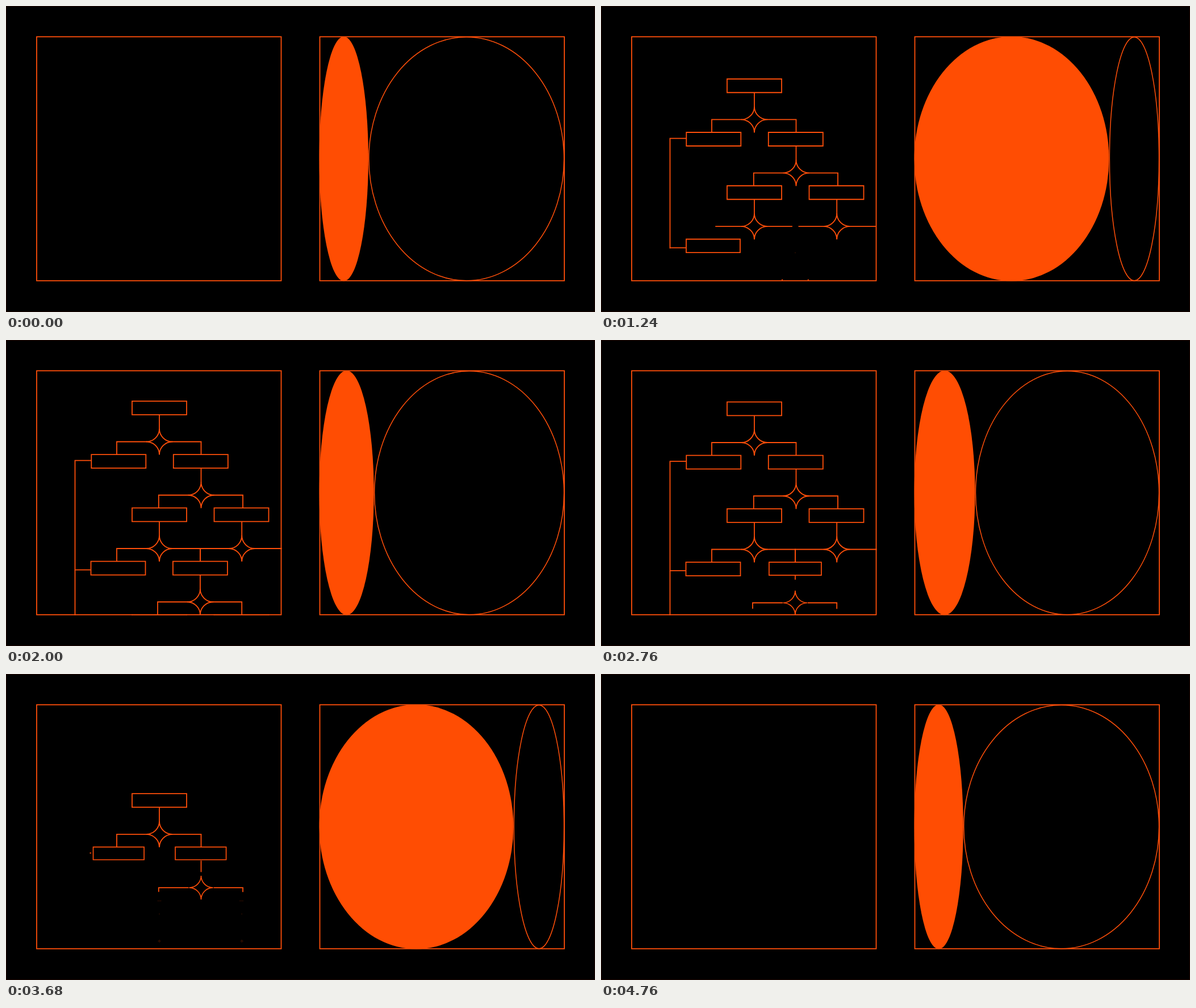
These frames come from a looping animation (1037 px wide and 540 px high, 4.8 s). An HTML page:

```html
<!DOCTYPE html>
<html lang="en">
<head>
<meta charset="utf-8">
<title>Growing flowchart and trading ellipses</title>
<style>
  html, body { margin: 0; width: 100%; height: 100%; overflow: hidden; background: #000; }
  svg { display: block; width: 100%; height: 100%; fill: none; stroke: #ff4f0a; stroke-width: 1.8; }
  #edge { stroke: #1e0600; stroke-width: 1; }
  #solid { fill: #ff4d03; stroke: none; }
  #ring { stroke-width: 1.5; }
</style>
</head>
<body>
<svg viewBox="0 0 1037 540">
  <clipPath id="panel"><rect x="53" y="53.4" width="432.6" height="432.3"/></clipPath>
  <rect id="edge" x=".5" y=".5" width="1036" height="539"/>
  <g clip-path="url(#panel)"><g id="tree"></g></g>
  <rect x="54" y="54.3" width="430.5" height="430.5"/>
  <rect x="552.5" y="54.3" width="430.5" height="430.5"/>
  <ellipse id="solid" cy="269.7" ry="215.8"/>
  <ellipse id="ring" cy="269.7" ry="215"/>
</svg>
<script>
const LOOP = 4800, STEP = 40, MIRROR = 4334;
const ARM = 23, BOX_W = 96, BOX_H = 24;
const $ = id => document.getElementById(id);
const tree = $('tree'), parts = [];

// Closed form of cubic-bezier(1, 0, 0, 1)
function ease(x) {
  x = Math.min(1, Math.max(0, x));
  const s = (1 + Math.cbrt(2 * x - 1)) / 2;
  return s * s * (3 - 2 * s);
}
const progress = (t, start, dur) => ease((t - start) / dur);

function add(d, start, dur, update) {
  const el = document.createElementNS('http://www.w3.org/2000/svg', 'path');
  el.setAttribute('d', d);
  tree.append(el);
  parts.push({ el, start, dur, update });
  return el;
}

function grow(x, y, d, start) {
  add(d, start, 500, (el, p) => {
    el.setAttribute('transform', `translate(${x} ${y}) scale(${p})`);
  });
}

function line(d, start, dur = 500) {
  const el = add(d, start, dur, (el, p) => {
    el.setAttribute('stroke-dasharray', `${p} 2`);
    el.setAttribute('visibility', p > 0 ? 'visible' : 'hidden');
  });
  el.setAttribute('pathLength', 1);
}

// Boxes grow from the middle of their top side, stars from their centre
const box = (x, y, start) =>
  grow(x, y, `M${-BOX_W / 2} 0h${BOX_W}v${BOX_H}h${-BOX_W}z`, start);

const star = (x, y, start) => {
  const arc = (dx, dy) => `a${ARM} ${ARM} 0 0 0 ${dx} ${dy}`;
  grow(x, y, `M0 ${-ARM}` + arc(ARM, ARM) + arc(-ARM, ARM) + arc(-ARM, -ARM) + arc(ARM, -ARM) + 'z', start);
};

// Connector below a box, its star, and the two arms that lead to the next row
function fork(x, top, left, right, at, dur = 500) {
  const y = top + 71.7;
  line(`M${x} ${top + BOX_H}V${y - ARM + 1}`, at.stem, dur);
  star(x, y, at.star);
  line(`M${x - ARM + 1} ${y}H${left}V${y + 22.6}`, at.arms, dur);
  line(`M${x + ARM - 1} ${y}H${right}V${y + 22.6}`, at.arms, dur);
}

const rows = [0, 1, 2, 3, 4].map(i => 107.8 + 94.25 * i);

box(270, rows[0], 60);
fork(270, rows[0], 195, 343.5, { stem: 110, star: 90, arms: 130 });

box(198.3, rows[1], 324);
box(342.8, rows[1], 324);
fork(343.5, rows[1], 268.8, 417, { stem: 388, star: 340, arms: 385 });

box(270, rows[2], 488);
box(414.5, rows[2], 488);
const third = { stem: 600, star: 460, arms: 989 };
fork(270, rows[2], 195, 342, third);
fork(415.2, rows[2], 342, 490, third);

box(197.5, rows[3], 820);
box(341.9, rows[3], 1217);
fork(341.9, rows[3], 267, 415.2, { stem: 1089, star: 1246, arms: 1014 }, 1000);

box(270, rows[4], 1490);
box(414.5, rows[4], 1490);

line('M150 212.6H121.5V405.7H149.5', 560, 600);
line('M121.5 405.7V600', 1180);

function drawTree(t) {
  const time = Math.min(t, MIRROR - t);
  const drop = 103.4 * (1 - progress(time, 595, 1200));
  tree.setAttribute('transform', `translate(0 ${drop})`);
  for (const { el, start, dur, update } of parts) update(el, progress(time, start, dur));
}

function span(el, x0, x1) {
  el.setAttribute('cx', (x0 + x1) / 2);
  el.setAttribute('rx', (x1 - x0) / 2);
}

function drawEllipses(t) {
  const rise = 1128, cycle = LOOP / 2;
  const u = (t + 48) % cycle;
  const p = u < rise ? ease(u / rise) : 1 - ease((u - rise) / (cycle - rise));
  const split = 637.8 + 258.2 * p;
  span($('solid'), 551.5, split);
  span($('ring'), split + .9, 982.5);
}

function frame(now) {
  const t = Math.floor((now % LOOP) / STEP) * STEP;
  drawTree(t);
  drawEllipses(t);
  requestAnimationFrame(frame);
}
frame(0);
</script>
</body>
</html>
```
